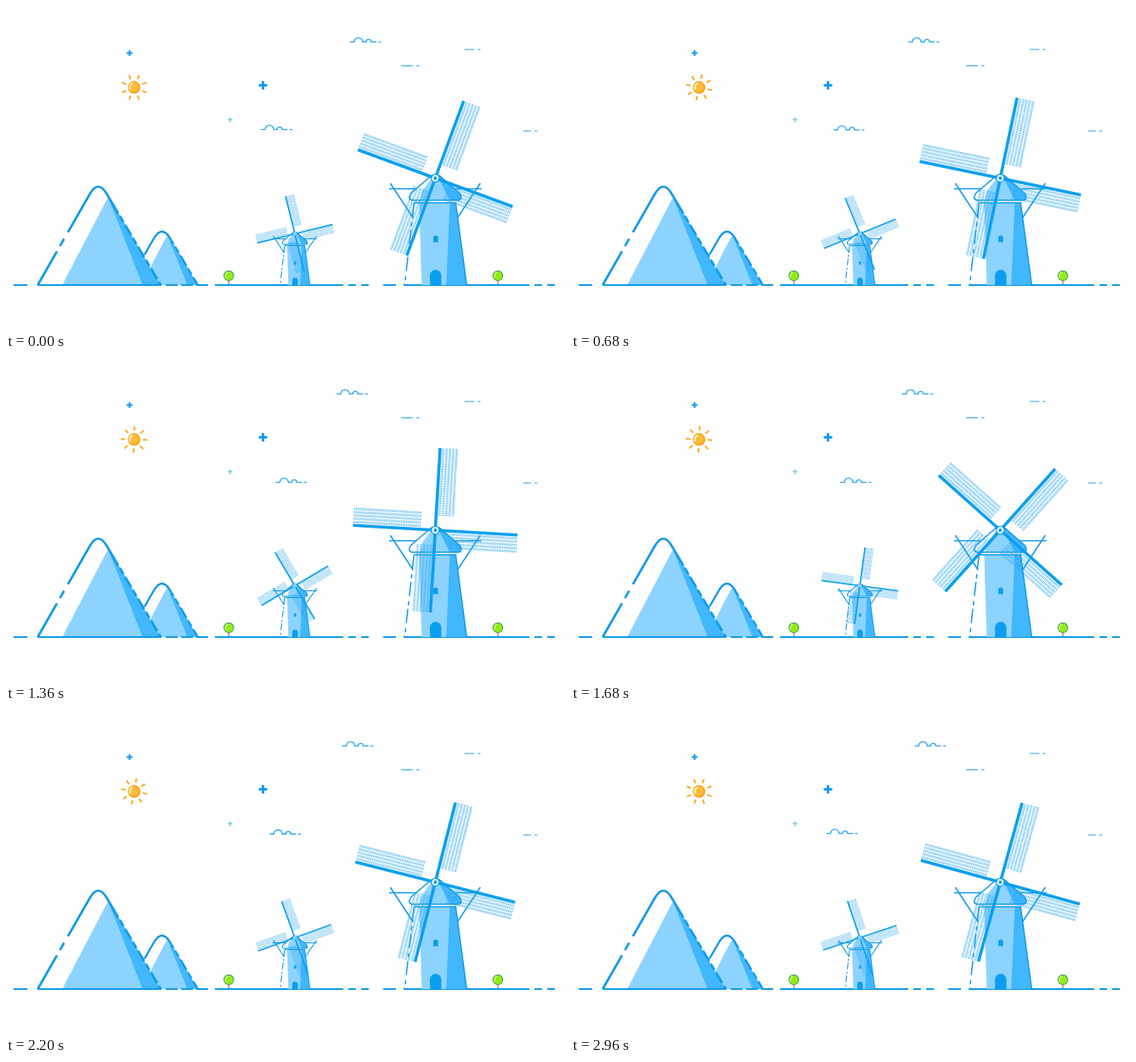
An HTML page with a canvas that plays this animation: 658 px wide and 382 px high, repeating every 3 s.

```html
<!DOCTYPE html>
<html lang="en">
<head>
<meta charset="utf-8">
<title>Windmills</title>
<style>
html, body { margin: 0; width: 100%; height: 100%; overflow: hidden; background: #fefefe; }
canvas { display: block; width: 658px; height: 382px; }
</style>
</head>
<body>
<canvas id="stage" width="658" height="382"></canvas>
<script>
const ctx = document.getElementById('stage').getContext('2d');
const LOOP = 3000, STEP = 40, GROUND = 329, TAU = Math.PI * 2;
const LINE = '#109ae9', THIN = '#2ba6ef', LIGHT = '#8dd3ff', DARK = '#40b7ff', BOLD = '#0c9ff0';

function paint(color, width) {
  ctx.strokeStyle = color;
  ctx.lineWidth = width;
  ctx.stroke();
}

function line(color, width, x0, y0, x1, y1, dash = []) {
  ctx.setLineDash(dash);
  ctx.beginPath();
  ctx.moveTo(x0, y0);
  ctx.lineTo(x1, y1);
  paint(color, width);
  ctx.setLineDash([]);
}

function fill(color, ...pts) {
  ctx.beginPath();
  for (let i = 0; i < pts.length; i += 2) ctx.lineTo(pts[i], pts[i + 1]);
  ctx.fillStyle = color;
  ctx.fill();
}

function disc(x, y, r, color) {
  ctx.beginPath();
  ctx.arc(x, y, r, 0, TAU);
  ctx.fillStyle = color;
  ctx.fill();
}

function shine(r, width, color) {
  ctx.beginPath();
  ctx.arc(0, 0, r, TAU * 0.42, TAU * 0.7);
  paint(color, width);
}

function plus(x, y, r, width, color) {
  line(color, width, x - r, y, x + r, y);
  line(color, width, x, y - r, x, y + r);
}

// Two slopes meeting at (cx, apex), rounded off at the top.
function mountain(cx, apex, width) {
  const h = GROUND - apex, k = h / 125, trim = 17;
  const left = 0.572, right = 0.592;
  const tx = cx + 0.1 * h, ty = apex + 0.16 * h, edge = cx + 0.588 * h;

  ctx.beginPath();
  ctx.moveTo(cx - 0.34 * h, GROUND);
  ctx.lineTo(tx - 3, ty + 5);
  ctx.quadraticCurveTo(tx, ty - 1, tx + 3, ty + 5);
  ctx.lineTo(edge, GROUND);
  ctx.fillStyle = LIGHT;
  ctx.fill();
  fill(DARK, tx, ty + 3, tx + 3, ty + 5, edge, GROUND, cx + 0.42 * h, GROUND);

  const bend = apex + 0.32 * h, bendX = cx + right * 0.32 * h;
  ctx.setLineDash([46 * k, 7 * k, 10 * k, 9 * k, 500, 0]);
  ctx.beginPath();
  ctx.moveTo(cx - left * h, GROUND);
  ctx.lineTo(cx - left * trim, apex + trim);
  ctx.quadraticCurveTo(cx, apex, cx + right * trim, apex + trim);
  ctx.lineTo(bendX, bend);
  paint(LINE, width);
  line(LINE, width, bendX, bend, cx + right * h, GROUND, [0, 4, 8, 4, 14, 0]);
}

// A long line that ends in two short dashes.
function road(x0, x1) {
  line(LINE, 2, x0, GROUND, x1, GROUND);
  line(LINE, 2, x1 + 6, GROUND, x1 + 31, GROUND, [9, 6]);
}

function ground() {
  line(LINE, 2, 9, GROUND, 25, GROUND);
  line(LINE, 2, 37, GROUND, 183, GROUND);
  line(LINE, 2, 188, GROUND, 238, GROUND, [14, 4]);
  road(246, 397);
  line(LINE, 2, 444, GROUND, 459, GROUND);
  road(468, 616);
}

function tree(x) {
  line('#b98a4a', 1.5, x, 322, x, 328);
  ctx.save();
  ctx.translate(x, 318);
  disc(0, 0, 6.2, '#3f9e5b');
  disc(0, 0, 5.2, '#94ec18');
  shine(4.2, 1.2, '#e8ffc4');
  ctx.restore();
}

function sun(angle) {
  ctx.save();
  ctx.translate(150.8, 96);
  disc(0, 0, 7.4, '#f9a51d');
  disc(-0.6, -0.4, 5.8, '#ffbc3a');
  shine(5, 1.8, '#fff6e0');
  ctx.rotate(angle * Math.PI / 180);
  for (let i = 0; i < 8; i++) {
    line('#fba81f', 1.9, 0, -10.4, 0, -15.6);
    ctx.rotate(TAU / 8);
  }
  ctx.restore();
}

function cloud(x, y) {
  ctx.beginPath();
  ctx.moveTo(x, y);
  ctx.arc(x + 9.8, y, 5, Math.PI, TAU);
  ctx.arc(x + 21.8, y, 3, Math.PI, TAU);
  ctx.lineTo(x + 31, y);
  ctx.moveTo(x + 33.5, y);
  ctx.lineTo(x + 36.5, y);
  paint(THIN, 1.3);
}

function breeze(x, y, len) {
  line(THIN, 1.1, x, y, x + len + 7.5, y, [len, 4]);
}

function sky(swing) {
  plus(145.5, 55.5, 3.5, 2, LINE);
  plus(302.5, 93.5, 5, 3, BOLD);
  plus(263.8, 134, 2.9, 1.2, '#58cddb');
  breeze(540, 51.3, 11);
  breeze(465, 70.5, 14);
  breeze(609, 147.2, 9);
  sun(22.5 * (1 - swing));
  cloud(405 - 17.25 * swing, 42.3);
  cloud(300.3 + 19 * swing, 145.6 + 1.2 * swing);
}

function arch(x, top, w, bottom) {
  const r = w / 2;
  ctx.beginPath();
  ctx.moveTo(x - r, bottom);
  ctx.arc(x, top + r, r, Math.PI, TAU);
  ctx.lineTo(x + r, bottom);
  ctx.fillStyle = BOLD;
  ctx.fill();
}

function tower(width) {
  fill(LIGHT, -19, 29, 24, 29, 37, 126, -16, 126);
  fill(DARK, 17, 29, 24, 29, 37, 126, 13, 126);
  line(LINE, width, -25, 29, -36, 126, [17, 6, 5, 4]);
  line(LINE, width, 24, 29, 37, 126);
  line(LINE, width, -25, 29, 25, 29);
  arch(0.5, 108, 13.5, 126);
  arch(0.5, 67.5, 5.6, 75.5);

  for (const s of [-1, 1]) {
    line(LINE, width, s * 54.5, 12.5, s * 22, 12.5);
    line(LINE, width, s * 53, 6, s * 26, 47);
  }
}

function cap(width) {
  fill(LIGHT, -1, -4, 5, -4, 30, 20, 29, 26, -18, 26, -15, 14);
  fill(DARK, 2, -4, 8, -1, 31, 20, 29, 26, 17, 26);
  ctx.beginPath();
  ctx.moveTo(-8, 0);
  ctx.lineTo(-29, 18);
  ctx.quadraticCurveTo(-33, 25, -27, 26);
  ctx.lineTo(27, 26);
  ctx.quadraticCurveTo(33, 25, 29, 18);
  ctx.lineTo(8, 0);
  ctx.quadraticCurveTo(0, -8, -8, 0);
  paint(LINE, width);
}

function blade(len) {
  ctx.globalAlpha = 0.65;
  for (let x = 4; x < 21; x += 3.9) line(THIN, 2.8, x, -17.5, x, -len, [1.2, 0.8]);
  ctx.globalAlpha = 1;
  line(BOLD, 3.6, 0, 0, 0, -len);
}

function mill(x, y, scale, len, width, angle) {
  ctx.save();
  ctx.translate(x, y);
  ctx.scale(scale, scale);
  tower(width / scale);
  cap(width / scale);
  ctx.rotate(angle * Math.PI / 180);
  for (let i = 0; i < 4; i++) {
    blade(len);
    ctx.rotate(TAU / 4);
  }
  disc(0, 0, 5.2, BOLD);
  disc(0, 0, 3.9, '#fff');
  disc(0, 0, 2, BOLD);
  ctx.restore();
}

function draw(ms) {
  const t = Math.floor((ms % LOOP) / STEP) * STEP / LOOP;
  const swing = 1 - Math.abs(1 - 2 * t);
  ctx.fillStyle = '#fefefe';
  ctx.fillRect(0, 0, 658, 382);
  sky(swing);
  mountain(183.5, 257.5, 2.4);
  mountain(108.5, 204.5, 2.7);
  ground();
  tree(262.3);
  tree(579);
  mill(340, 268.5, 0.48, 95, 1.1, 76.2 + 360 * t);
  mill(505.3, 203, 1, 97, 1.5, 20.2 + 360 * t);
}

const start = performance.now();
function tick() {
  draw(performance.now() - start);
  requestAnimationFrame(tick);
}
tick();
</script>
</body>
</html>
```
